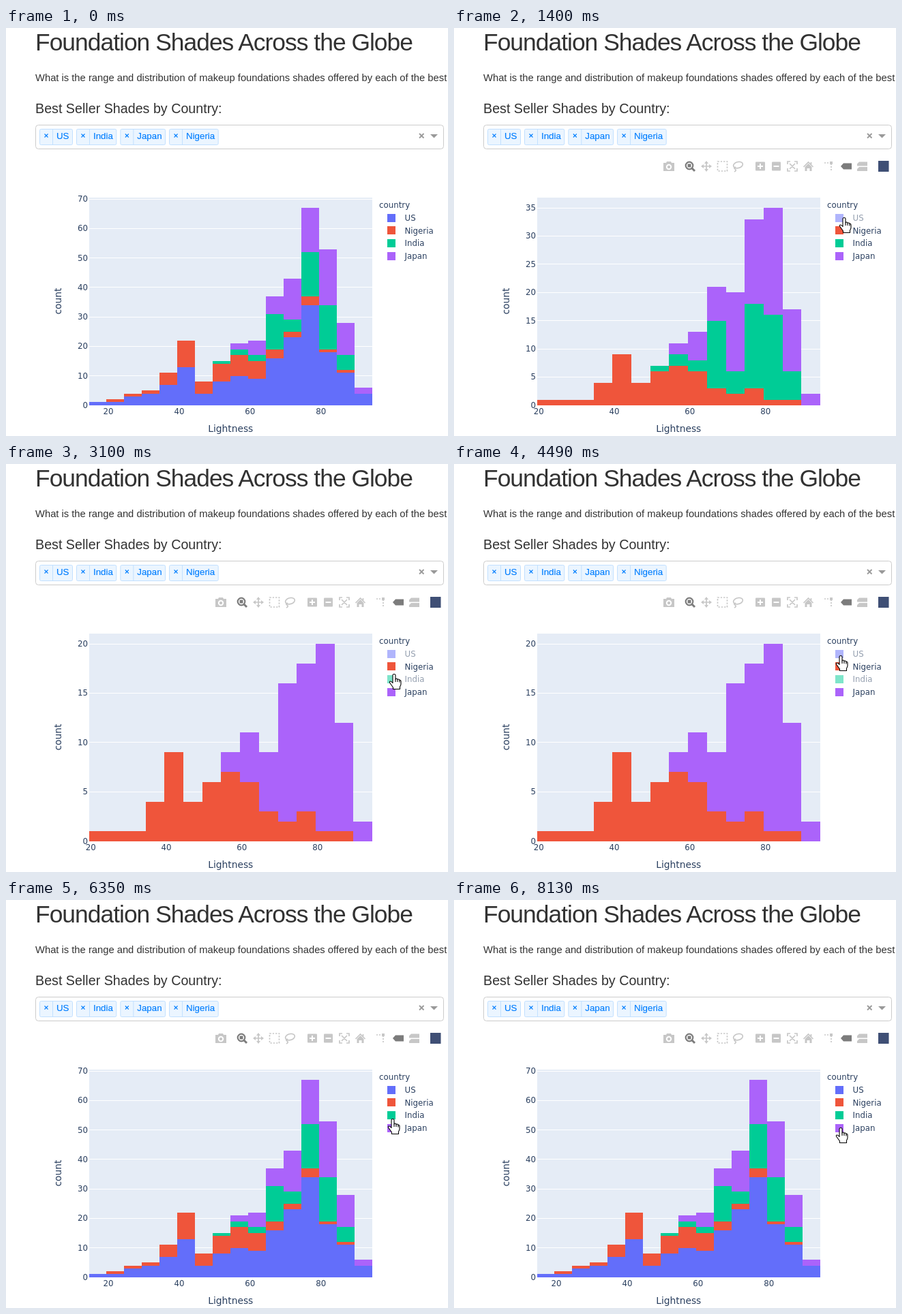
An HTML page for the animation above (8440 ms loop, 648 px wide and 599 px high).

```html
<!DOCTYPE html>
<html lang="en">
<head>
<meta charset="utf-8">
<title>Foundation Shades</title>
<style>
  html, body { margin: 0; width: 100%; height: 100%; overflow: hidden; background: #fff; }
  svg { display: block; width: 648px; height: 599px; }
  .page { font-family: "Liberation Sans", Arial, sans-serif; fill: #323232; }
  .plot { font: 11.8px "DejaVu Sans", Verdana, sans-serif; fill: #2a3f5f; }
  .axis { font-size: 13.8px; text-anchor: middle; }
  .chip { font-size: 13.3px; fill: #007eff; stroke: #007eff; stroke-width: .15; }
  .crisp { shape-rendering: crispEdges; }
  #bar { fill: #c7c7c7; stroke: #c7c7c7; stroke-width: 0; }
  #bar .line { fill: none; stroke-width: 1.7; }
  #bar .cut { fill: none; stroke: #fff; stroke-width: 2; }
  #bar .on { fill: #7c7c7c; stroke: #7c7c7c; }
  .pointer { fill: #fff; stroke: #000; stroke-width: 1.1; stroke-linejoin: round; }
</style>
</head>
<body>
<svg viewBox="0 0 648 599">
  <g class="page">
    <text x="43" y="33" font-size="35.4" letter-spacing="-.98">Foundation Shades Across the Globe</text>
    <text x="43" y="78" font-size="14.76">What is the range and distribution of makeup foundations shades offered by each of the best</text>
    <text x="43" y="125" font-size="19.7">Best Seller Shades by Country:</text>
    <rect x="43.5" y="142.5" width="598" height="35" rx="4" fill="#fff" stroke="#ccc"/>
    <g id="chips"></g>
    <path d="M606 155l6.500 6.500m0-6.500l-6.500 6.500" stroke="#999" stroke-width="1.8"/>
    <path d="M622 156h11l-5.500 5.500z" fill="#999"/>
  </g>

  <!-- each icon is drawn around its own centre -->
  <g id="bar">
    <g data-x="315"><path d="M-8-5h4l1-2h6l1 2h4v12h-16z"/><circle class="cut" cy="1" r="3.2"/></g>
    <g data-x="345" class="on"><circle class="line" cy="-1" r="5.3" style="stroke-width:2.2"/><path d="M-2.500-3.500h5v5h-5z"/><path class="line" d="M4 3l4 4" style="stroke-width:3"/></g>
    <g data-x="370"><path class="line" d="M-6 0H6M0-6V6"/><path d="M0-8l3 4h-6zM0 8l3-4h-6zM-8 0l4-3v6zM8 0l-4-3v6z"/></g>
    <g data-x="393.5"><path class="line" stroke-dasharray="2.300 2" d="M-7-7H7V7H-7z"/></g>
    <g data-x="417"><ellipse class="line" cy="-2" rx="7" ry="4.5" transform="rotate(-15)"/><path class="line" d="M-4 1q-4 1-1 3t-1 4"/></g>
    <g data-x="449"><rect x="-7" y="-6.5" width="14" height="13" rx="1"/><path class="cut" d="M-4 0H4M0-4V4"/></g>
    <g data-x="472.5"><rect x="-6.500" y="-6.5" width="13" height="13" rx="1"/><path class="cut" d="M-4 0H4"/></g>
    <g data-x="496"><path class="line" d="M-7-3v-4h4m6 0h4v4m0 6v4h-4m-6 0h-4v-4M-4-4L4 4M4-4L-4 4"/></g>
    <g data-x="519.5"><path class="line" d="M-7 1L0-6L7 1M4-6v3"/><path d="M-5 1L0-4L5 1V7H2V3H-2V7H-5z"/></g>
    <g data-x="549"><path class="line" stroke-dasharray="2 2" d="M-6-5H2M4-4V8"/><path d="M2-7h4v4h-4z"/></g>
    <g data-x="575" class="on"><path d="M-8 0l4-4.500H8v9H-4z"/></g>
    <g data-x="598"><path d="M-7-3.500l3-3H8v6H-7zM-7 4l3-3H8v6H-7z"/></g>
    <g data-x="630"><rect x="-8" y="-8" width="15.500" height="16" fill="#3f4f75"/></g>
  </g>

  <g class="plot">
    <g id="chart"></g>
    <text class="axis" x="329.300" y="593">Lightness</text>
    <text class="axis" transform="translate(81 401) rotate(-90)">count</text>
    <text x="547" y="264">country</text>
    <g id="legend"></g>
  </g>

  <g id="cursor">
    <path id="arrow" class="pointer" d="M0 0V17L4 13 7 19 9 18 6 12H12Z"/>
    <g id="hand" class="pointer" transform="translate(-1 -1)">
      <path d="M-2 2Q-2 .5 0 .5T2 2V8Q2 7 3.500 7T5 8.500Q5 8 6.500 8T8 9.500Q10 9 10 11V15Q10 17 8.500 19V22.500H-1.500V20L-6.500 13Q-7 11-5.500 11T-2 13.500Z"/>
      <path fill="none" d="M2 8v4M5 8.500v3.500M8 9.500v3"/>
    </g>
  </g>
</svg>
<script>
const LOOP = 8440, TICK = 77.5, BINS = 16, LOW = 14.5, BIN = 5;
const $ = id => document.getElementById(id);

// each distribution is a sum of bell curves: [centre bin, width, height]
const series = [
  { name: 'US', color: '#636efa',
    bells: [[3, 2.2, 3.4], [4.9, .9, 11.8], [7.45, 1, 8.6], [11.65, 2.58, 24.1], [12, .4, 10.4]] },
  { name: 'Nigeria', color: '#ef553b',
    bells: [[7.5, 7.3, 1.3], [4.77, .82, 7.8], [8, 1.95, 5.7], [12, .6, 2]] },
  { name: 'India', color: '#00cc96',
    bells: [[8.4, 1.4, 2.1], [10, .4, 11.5], [12.53, 1.29, 17.4]] },
  { name: 'Japan', color: '#ab63fa',
    bells: [[8.7, .65, 5], [10.97, 1.1, 12.2], [13.03, 1.31, 19]] }
];
const count = (bells, bin) => Math.round(
  bells.reduce((sum, [c, w, h]) => sum + h * Math.exp(-(((bin - c) / w) ** 2)), 0));
for (const s of series) s.n = Array.from({ length: BINS }, (_, bin) => count(s.bells, bin));

const box = { x: 121.5, y: 248.8, w: 415.5, h: 305 };
const base = box.y + box.h;

// legend clicks: time and the names shown from then on
const ALL = 'US Nigeria India Japan';
const clicks = [[0, ALL], [1400, 'Nigeria India Japan'], [2320, 'Nigeria Japan'],
  [4560, 'Nigeria India Japan'], [5270, ALL], [6970, 'Japan'], [8130, ALL]];

// pointer moves: start, end, x and y reached
const entry = [622, 546];
const moves = [
  [80, 850, 573, 279], [1550, 1710, 570, 311], [3100, 3410, 571, 301], [3870, 4180, 567, 313],
  [4330, 4490, 568, 282], [5350, 5800, 568, 306], [5970, 6580, 568, 335]
];

const rect = (x, y, w, h, fill, more = 'class="crisp"') =>
  `<rect x="${x}" y="${y}" width="${w}" height="${h}" fill="${fill}" ${more}/>`;
const label = (x, y, text, more = '') => `<text x="${x}" y="${y}" ${more}>${text}</text>`;

function drawChips() {
  let x = 49;
  for (const name of ['US', 'India', 'Japan', 'Nigeria']) {
    const g = document.createElementNS('http://www.w3.org/2000/svg', 'g');
    $('chips').append(g);
    g.innerHTML = label(x + 25, 163, name, 'class="chip"');
    const w = g.firstChild.getComputedTextLength() + 30.5;
    g.innerHTML = rect(x + .5, 148.5, w - 1, 23, '#ebf5ff', 'rx="2" stroke="#c2e0ff"') +
      `<path d="M${x + 19.5} 149v22" stroke="#c2e0ff"/>` +
      `<path d="M${x + 7.5} 155.500l5 5m0-5l-5 5" stroke="#007eff" stroke-width="1.100"/>` + g.innerHTML;
    x += w + 5;
  }
}

function drawChart(names) {
  const shown = series.filter(s => names.includes(s.name));
  const totals = series[0].n.map((_, b) => shown.reduce((sum, s) => sum + s.n[b], 0));
  const first = totals.findIndex(v => v > 0);
  const bins = BINS - first;
  const low = LOW + BIN * first, high = LOW + BIN * BINS;
  const binW = box.w / bins;
  const max = Math.max(...totals) / .95;
  const yStep = max > 50 ? 10 : 5, xStep = bins > 10 ? 20 : 10;
  const px = v => box.x + (v - low) / BIN * binW;
  const py = v => base - v / max * box.h;
  let out = rect(box.x, box.y, box.w, box.h, '#e5ecf6'), ticks = '';

  for (let v = 0; v <= max + .001; v += yStep) {
    out += `<path class="crisp" d="M${box.x} ${py(v)}h${box.w}" stroke="#fff"/>`;
    ticks += label(120, py(v) + 4, v, 'text-anchor="end"');
  }
  for (let v = Math.ceil(low / xStep) * xStep; v < high; v += xStep) {
    ticks += label(px(v), 567, v, 'text-anchor="middle"');
  }
  for (let b = first; b < BINS; b++) {
    let sum = 0;
    for (const s of shown) {
      const top = py(sum + s.n[b]);
      if (s.n[b]) out += rect(box.x + (b - first) * binW, top, binW, py(sum) - top, s.color);
      sum += s.n[b];
    }
  }
  $('chart').innerHTML = out + ticks;

  $('legend').innerHTML = series.map((s, i) => {
    const y = 278.5 + 18.67 * i;
    return `<g opacity="${shown.includes(s) ? 1 : .5}">` +
      rect(559, y - 6, 12, 12, s.color) + label(584.5, y + 4.5, s.name) + '</g>';
  }).join('');
}

function pointerAt(t) {
  let [x, y] = entry;
  for (const [start, end, toX, toY] of moves) {
    if (t < start) break;
    const gaps = Math.round((end - start) / TICK);
    const step = Math.floor((t - start) / (end - start) * gaps + .001) + 1;
    const p = Math.min(step / (gaps + 1), 1);
    x += (toX - x) * p;
    y += (toY - y) * p;
  }
  return [Math.round(x), Math.round(y)];
}

let current = '';
function draw(t) {
  const names = clicks.filter(c => c[0] <= t).pop()[1];
  if (names !== current) drawChart(current = names);

  const inside = t >= moves[0][0];
  $('cursor').style.display = inside ? '' : 'none';
  $('bar').style.opacity = inside ? Math.min(1, (Math.floor((t - moves[0][0]) / TICK) + 1) / 4) : 0;
  const [x, y] = pointerAt(t);
  const overLegend = y < 345;
  $('cursor').setAttribute('transform', `translate(${x} ${y})`);
  $('hand').style.display = overLegend ? '' : 'none';
  $('arrow').style.display = overLegend ? 'none' : '';
}

for (const icon of $('bar').children) icon.setAttribute('transform', `translate(${icon.dataset.x} 203)`);
drawChips();
const begin = performance.now();
function frame() {
  draw((performance.now() - begin) % LOOP);
  requestAnimationFrame(frame);
}
frame();
</script>
</body>
</html>
```
